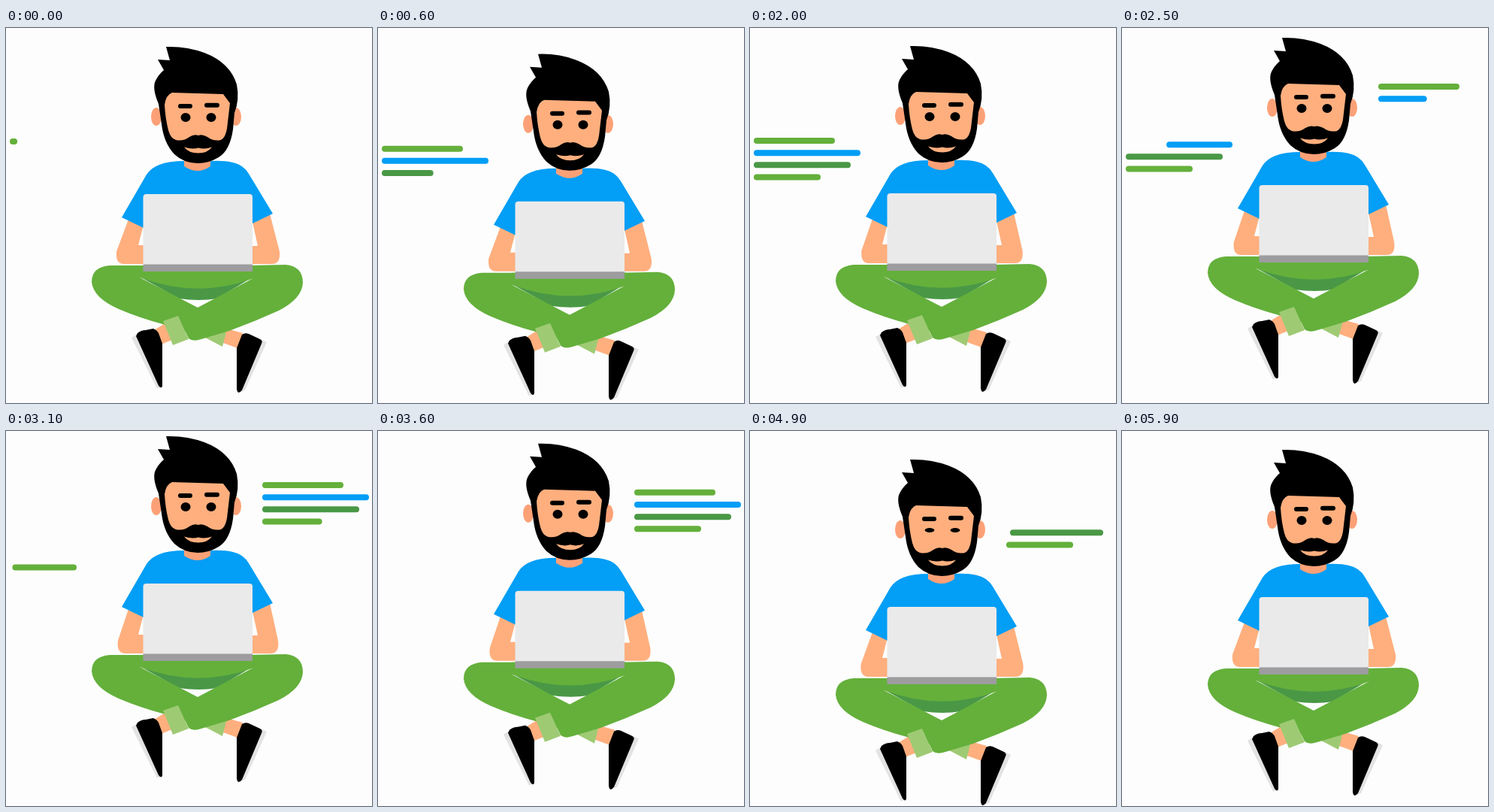
An HTML page with a canvas that plays this animation: 487x499 px, repeating every 6000 ms.

```html
<!DOCTYPE html>
<html>
<head>
<meta charset="utf-8">
<style>
html, body { margin: 0; width: 100%; height: 100%; overflow: hidden; background: #fdfdfd; }
canvas { display: block; filter: blur(0.5px); }
</style>
</head>
<body>
<canvas id="stage" width="487" height="499"></canvas>
<script>
const ctx = document.getElementById('stage').getContext('2d');
const LOOP = 6000, STEP = 100;
const SKIN = '#ffaf7e', SHADE = '#fca177', BLUE = '#039ef5', GREEN = '#64b03b', DARK = '#4a9846',
  CUFF = '#9fca74', SOLE = '#e3e3e3', BLACK = '#000', PAPER = '#fdfdfd';

// Vertical float: [time, offset]
const FLOAT = [[0, 0], [350, 6.3], [700, 11], [950, 13], [1100, 12], [1400, 8.3],
  [2000, -1], [2800, -18.5], [2950, -20.8], [3100, -18], [3500, -10], [4200, 3],
  [4600, 9.5], [4900, 13], [5050, 13.5], [5250, 11], [5600, 5], [5900, 0], [6000, 0]];

// Rows are typed one after another, then wiped the same way
const ROWS = [GREEN, BLUE, DARK, GREEN];
const GROW = 246, WIPE = 362;
const GROUPS = [
  { x: 5, y: 151, ends: [113, 147, 134, 94], grow: -23, wipe: 2000 },
  { x: 341, y: 90, ends: [449, 483, 470, 430], grow: 2142, wipe: 4162 }
];

const clamp = v => Math.max(0, Math.min(1, v));

function floatAt(t) {
  const i = FLOAT.findIndex(p => p[0] > t);
  const [t0, y0] = FLOAT[i - 1], [t1, y1] = FLOAT[i];
  return y0 + (y1 - y0) * (t - t0) / (t1 - t0);
}

function fill(color, path) {
  ctx.fillStyle = color;
  ctx.fill(new Path2D(path));
}

function oval(color, x, y, rx, ry) {
  ctx.fillStyle = color;
  ctx.beginPath();
  ctx.ellipse(x, y, rx, ry, 0, 0, Math.PI * 2);
  ctx.fill();
}

function bar(color, x0, x1, y, width) {
  const r = width / 2;
  ctx.strokeStyle = color;
  ctx.lineWidth = width;
  ctx.lineCap = 'round';
  ctx.beginPath();
  ctx.moveTo(x0 + r, y);
  ctx.lineTo(Math.max(x0 + r + 0.1, x1 - r), y);
  ctx.stroke();
}

function codeLines({ x, y, ends, grow, wipe }, t) {
  ROWS.forEach((color, i) => {
    const length = ends[i] - x;
    const shown = clamp((t - grow) / GROW - i);
    const wiped = clamp((t - wipe) / WIPE - i);
    if (shown <= 0 || wiped >= 1) return;
    bar(color, x + length * wiped, x + length * shown, y + i * 16.15, 8);
  });
}

function torso(t) {
  const out = Math.cos(t / LOOP * Math.PI * 2) * 0.9;
  const left = 148 - out, right = 363 + out;
  fill(SKIN, `M164 252 L${left} 297 Q${left - 2} 314 ${left + 10} 314 L186 314 L186 289 L176 289 L183 262Z`);
  fill(SKIN, `M351 247 L${right} 297 Q${right + 2} 314 ${right - 10} 314 L326 314 L326 290 L335 290 L328 258Z`);
  fill(BLUE, 'M238 177 Q216 177 204 182 Q193 186 187 195 L154 252 L183 266 L187 300 H326 V261 L355 247 L323 194 Q316 182 302 179 Q290 176 272 177Z');
  fill(SHADE, 'M237 172 H272 V184 Q255 196 237 184Z');
}

function head(t) {
  oval(SHADE, 200, 118, 7, 12);
  oval(SHADE, 306, 118, 7, 12);
  fill(BLACK, 'M213 25 Q240 24 264 33 Q298 46 307 75 Q311 95 304 113 L302 135 Q298 163 283 172 Q270 180 255 180 Q237 180 224 168 Q210 153 207 128 L203 101 Q194 80 199 70 Q203 62 210 56 L202 42 L218 43Z');
  fill(SKIN, 'M221 86 L289 88 L298 100 L294 134 Q292 146 286 149 Q276 151 268 145 Q261 141 256 143 Q250 141 244 145 Q236 151 226 149 Q219 147 216 136 Q212 120 211 102 Q213 89 221 86Z');
  fill(SKIN, 'M237 158.5 Q248 162 256 159.5 Q264 162 274 158.5 Q268 166.5 256 166.5 Q243 166.5 237 158.5Z');
  bar(BLACK, 229, 248, 104, 6);
  bar(BLACK, 264, 284, 102.8, 6);
  const open = Math.max(0.15, clamp(Math.abs(t - 4960) / 125));
  oval(BLACK, 239, 119, 6.5, 6 * open);
  oval(BLACK, 273, 119, 6.5, 6 * open);
}

function legs() {
  fill(SKIN, 'M197 402 L215 391 L224 414 L206 421Z');
  fill(SKIN, 'M290 399 L315 406 L308 426 L286 418Z');
  fill(SOLE, 'M167 412 L177 406 L207 477 L201 480Z');
  fill(BLACK, 'M175 406 Q180 402 186 402 L196 400 Q201 402 203 406 L208 420 L208 476 Q207 481 203 476 L173 410Z');
  fill(SOLE, 'M339 414 L347 418 L318 482 L309 486Z');
  fill(BLACK, 'M314 408 Q318 405 323 407 L338 414 Q342 416 340 420 L314 482 Q308 489 307 480 L307 426Z');
  fill(DARK, 'M178 331 H329 L281 360 Q257 364 230 360Z');
  fill(GREEN, 'M178 316 H330 V333 Q255 361 178 332Z');
  fill(GREEN, 'M200 316 L138 316 Q114 318 114 338 Q116 359 150 374 Q178 386 212 395 L265 412 L293 403 L255 372 L178 332Z');
  fill(CUFF, 'M271 403 L294 401 L288 424 L265 412Z');
  fill(GREEN, 'M320 316 L372 315 Q395 317 395 339 Q394 360 363 376 Q330 391 297 403 L260 414 Q249 418 243 413 L229 384 L255 372 L329 333Z');
  fill(CUFF, 'M209 390 L229 383 L243 414 L222 422Z');
}

function laptop() {
  fill('#eaeaea', 'M187 221 H324 Q328 221 328 225 V316 H182.5 V225 Q182.5 221 187 221Z');
  fill('#9d9d9f', 'M182.5 314.5 H328 V324 H182.5Z');
}

function draw(t) {
  ctx.fillStyle = PAPER;
  ctx.fillRect(0, 0, 487, 499);
  ctx.save();
  ctx.translate(0, floatAt(t));
  GROUPS.forEach(group => codeLines(group, t));
  torso(t);
  head(t);
  legs();
  laptop();
  ctx.restore();
}

const start = performance.now();
function tick() {
  const t = (performance.now() - start) % LOOP;
  draw(Math.floor(t / STEP) * STEP);
  requestAnimationFrame(tick);
}
tick();
</script>
</body>
</html>
```
